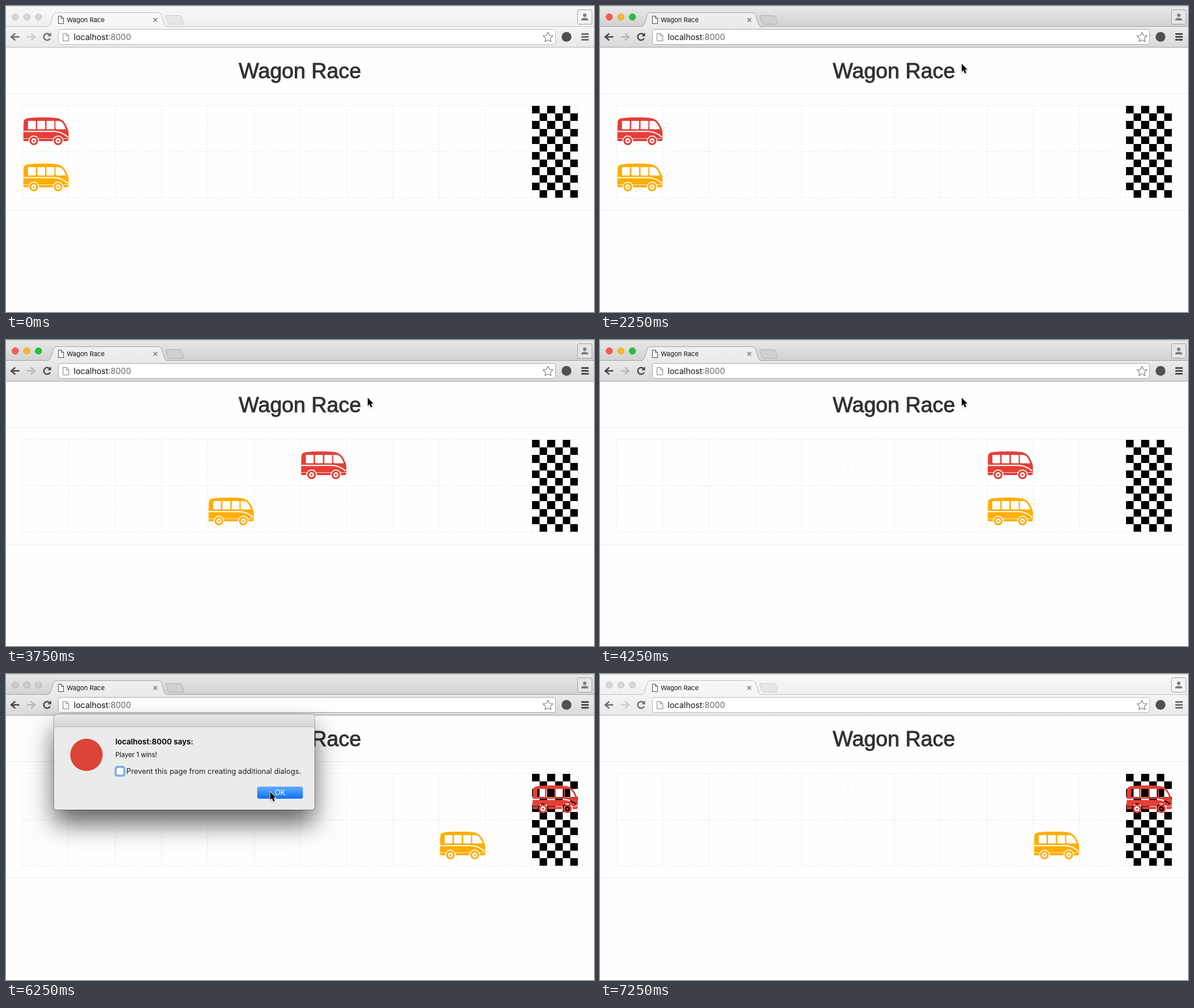
An HTML page with a canvas for the animation above (7500 ms loop, 1016 by 530 pixels).

```html
<!DOCTYPE html>
<html lang="en">
<head>
<meta charset="utf-8">
<title>Wagon Race</title>
<style>
html, body { margin: 0; width: 100%; height: 100%; overflow: hidden; background: #fefefe; }
canvas { display: block; }
</style>
</head>
<body>
<canvas id="stage" width="1016" height="530"></canvas>
<script>
const W = 1016, H = 530, LOOP = 7500, CELL = 80;
const UI = 'Inter, "Open Sans", sans-serif';
const ctx = document.getElementById('stage').getContext('2d');

// Later entries win: [start ms, values...]
const YELLOW = [[0, 0], [3250, 2], [3500, 3], [3750, 4], [4000, 6], [4250, 8], [4500, 9]];
const POINTER = [[0], [250, 625, 100], [5750, 468, 60], [6000, 435, 195],
  [6250, 456.5, 204], [6750, 668, -16], [7000]];

const at = (track, t) => track.filter(step => step[0] <= t).pop().slice(1);

function layer(w, h, draw) {
  const c = document.createElement('canvas');
  c.width = w;
  c.height = h;
  draw(c.getContext('2d'));
  return c;
}

function vertical(g, y0, y1, from, to) {
  const fill = g.createLinearGradient(0, y0, 0, y1);
  fill.addColorStop(0, from);
  fill.addColorStop(1, to);
  return fill;
}

function rect(g, x, y, w, h, color) {
  g.fillStyle = color;
  g.fillRect(x, y, w, h);
}

function round(g, x, y, w, h, r, fill, stroke) {
  g.beginPath();
  g.roundRect(x, y, w, h, r);
  paint(g, fill, stroke);
}

function disc(g, x, y, r, fill, stroke) {
  g.beginPath();
  g.arc(x, y, r, 0, Math.PI * 2);
  paint(g, fill, stroke);
}

function poly(g, points, fill, stroke, width, open) {
  g.beginPath();
  points.forEach(([x, y]) => g.lineTo(x, y));
  if (!open) g.closePath();
  paint(g, fill, stroke, width);
}

function paint(g, fill, stroke, width = 1) {
  if (fill) { g.fillStyle = fill; g.fill(); }
  if (stroke) { g.strokeStyle = stroke; g.lineWidth = width; g.stroke(); }
}

function text(g, str, x, y, font, color, align = 'left') {
  g.font = font;
  g.fillStyle = color;
  g.textAlign = align;
  g.fillText(str, x, y);
}

// ---- Buses: windows, stripes and hubs are holes, so the track shows through
function makeBus(color) {
  return layer(CELL, 50, g => {
    g.fillStyle = color;
    g.fill(new Path2D('M1 25L1.5 7Q2 1.5 12 1Q36 -1 56 .7Q67 1.5 72 9Q77 16 79 25V39L77 41H2Q1 41 1 39Z'));
    g.globalCompositeOperation = 'destination-out';
    for (const x of [9, 25, 41]) round(g, x, 6, 13.5, 14.5, 1, '#000');
    g.fill(new Path2D('M56.5 6H63Q70 7 74.5 20.5H59Q56.5 20.5 56.5 18Z'));
    g.lineWidth = 2;
    g.stroke(new Path2D('M0 24.2H55Q67 24.5 78 34'));
    g.lineWidth = 0.8;
    g.stroke(new Path2D('M1 36.5H79'));
    for (const x of [19, 61]) {
      g.globalCompositeOperation = 'destination-out';
      disc(g, x, 40.5, 9.2, '#000');
      g.globalCompositeOperation = 'source-over';
      disc(g, x, 40.5, 7.6, color);
      g.globalCompositeOperation = 'destination-out';
      disc(g, x, 40.5, 4.4, '#000');
      g.globalCompositeOperation = 'source-over';
      disc(g, x, 40.5, 1.8, color);
    }
  });
}

// ---- Page
function drawPage(g) {
  rect(g, 0, 0, W, H, '#fefefe');
  g.font = '36.8px "Liberation Sans", Arial, sans-serif';
  g.textAlign = 'center';
  g.fillStyle = g.strokeStyle = '#303030';
  g.lineWidth = 0.9;
  g.fillText('Wagon Race', 508, 125);
  g.strokeText('Wagon Race', 508, 125);
  rect(g, 0, 151, W, 1, '#ebebeb');
  rect(g, 0, 353, W, 1, '#ebebeb');

  g.strokeStyle = '#ececec';
  g.lineWidth = 1;
  g.setLineDash([4, 2]);
  g.beginPath();
  for (let x = 28.5; x < 990; x += CELL) { g.moveTo(x, 172); g.lineTo(x, 333); }
  for (let y = 172.5; y < 340; y += CELL) { g.moveTo(28, y); g.lineTo(989, y); }
  g.stroke();
  g.setLineDash([]);

  const s = 79 / 6;
  for (const top of [173, 253]) {
    rect(g, 909, top, 79, 79, '#fff');
    for (let r = 0; r < 6; r++) {
      for (let c = r % 2; c < 6; c += 2) {
        const x = Math.round(c * s), y = Math.round(r * s);
        rect(g, 909 + x, top + y, Math.round((c + 1) * s) - x, Math.round((r + 1) * s) - y, '#000');
      }
    }
  }
}

// ---- Browser window
function sheet(g, x, y, w, h, color) {
  poly(g, [[x, y], [x + w - 4, y], [x + w, y + 4], [x + w, y + h], [x, y + h]], '#fafafa', color);
  poly(g, [[x + w - 4, y], [x + w - 4, y + 4], [x + w, y + 4]], null, color, 1, true);
}

function arrow(g, x, dir, color) {
  poly(g, [[x + dir * 7, 47.5], [x, 53.5], [x + dir * 7, 59.5]], null, color, 2.6, true);
  poly(g, [[x + dir, 53.5], [x + dir * 14, 53.5]], null, color, 2.6, true);
}

function drawChrome(g, active, lit) {
  const ink = active ? '#4b4b4b' : '#707070';
  const edge = active ? '#a4a4a4' : '#c2c2c2';
  rect(g, 0, 0, W, 36, active ? vertical(g, 0, 36, '#e9e9e9', '#d1d1d1') : vertical(g, 0, 36, '#f8f8f8', '#f0f0f0'));
  rect(g, 0, 0, W, 1, active ? '#c4c4c4' : '#d8d8d8');
  rect(g, 0, 36, W, 36, active ? vertical(g, 36, 71, '#ebebeb', '#d9d9d9') : vertical(g, 36, 71, '#f5f5f5', '#e9e9e9'));
  rect(g, 0, 35, W, 1, edge);
  rect(g, 0, 71, W, 1, active ? '#a2a2a2' : '#b8b8b8');

  const lights = lit ? ['#ff5a52', '#fdb92c', '#28c33b'] : Array(3).fill(active ? '#cdcdcd' : '#d7d7d7');
  const rims = lit ? ['#e2463f', '#dfa023', '#1dac2c'] : Array(3).fill(active ? '#b0b0b0' : '#c5c5c5');
  lights.forEach((c, i) => disc(g, 16 + 20 * i, 19, 5.5, c, rims[i]));

  const tab = new Path2D('M71 36Q75 35.5 76.5 32L82 15Q83 11.5 87 11.5H263Q267 11.5 268.5 15L274 32Q275.500 35.5 279 36');
  g.fillStyle = active ? vertical(g, 11, 36, '#f0f0f0', '#ebebeb') : vertical(g, 11, 36, '#f9f9f9', '#f5f5f5');
  g.fill(tab);
  g.strokeStyle = edge;
  g.lineWidth = 1;
  g.stroke(tab);
  const plus = new Path2D('M278 16.500H300Q302.500 16.500 303.500 19L307 29.500Q307.500 31.500 305 31.500H284Q281 31.500 280 29L276 18.500Q275.500 16.500 278 16.500Z');
  g.fillStyle = active ? '#d0d0d0' : '#e6e6e6';
  g.fill(plus);
  g.strokeStyle = active ? '#b0b0b0' : '#cacaca';
  g.stroke(plus);

  sheet(g, 90.5, 17.5, 9, 13, '#4e4e4e');
  text(g, 'Wagon Race', 105, 28, '11px ' + UI, '#111');
  poly(g, [[254.8, 20.8], [261.2, 27.2]], null, '#777', 1.6, true);
  poly(g, [[261.2, 20.8], [254.8, 27.2]], null, '#777', 1.6, true);

  round(g, 987.5, 6.5, 25, 25, 2.5, active ? '#e6e6e6' : '#f4f4f4', '#a0a0a0');
  disc(g, 1000, 16, 3, '#7d7d7d');
  g.fill(new Path2D('M994 25V23Q995 20.500 1000 20.500T1006 23V25Z'));

  arrow(g, 9, 1, ink);
  arrow(g, 50, -1, active ? '#b9b9b9' : '#cecece');
  g.beginPath();
  g.arc(71, 53.5, 5.7, 0.45, Math.PI * 1.75);
  paint(g, null, ink, 2.5);
  poly(g, [[78, 46], [78, 52.5], [71.5, 52.5]], ink);

  round(g, 90.5, 40.5, 859, 26, 3, '#fff', active ? '#a9a9a9' : '#bcbcbc');
  sheet(g, 98.5, 47.5, 10, 13, '#858585');
  g.font = '14px ' + UI;
  const host = 'localhost';
  text(g, host, 117, 59, g.font, '#111');
  text(g, ':8000', 117 + g.measureText(host).width, 59, g.font, '#666');

  const star = Array.from({ length: 10 }, (_, i) => {
    const a = -Math.PI / 2 + i * Math.PI / 5, r = i % 2 ? 4.3 : 9;
    return [936.5 + r * Math.cos(a), 54.5 + r * Math.sin(a)];
  });
  g.lineJoin = 'round';
  poly(g, star, '#fff', '#808080', 1.2);
  g.lineJoin = 'miter';
  disc(g, 968.5, 53.5, 8.5, '#505050');
  for (const y of [47, 52, 57]) round(g, 994, y, 13, 3, 1, ink);
}

// ---- Alert box, on its own layer so it can zoom and fade as one
const BOX = { x: 83, y: 70, w: 450, h: 165 };

function drawAlert(g) {
  const { x, y, w, h } = BOX;
  g.save();
  g.shadowColor = 'rgba(0,0,0,.62)';
  g.shadowBlur = 44;
  g.shadowOffsetY = 24;
  round(g, x, y, w, h, 5, '#ebebeb');
  g.restore();
  round(g, x - 0.5, y - 0.5, w + 1, h + 1, 5, null, 'rgba(0,0,0,.28)');
  round(g, x, y, w, 22, [5, 5, 0, 0], vertical(g, y, y + 22, '#e8e8e8', '#d5d5d5'));
  rect(g, x, 91, w, 1, '#b7b7b7');

  disc(g, 139, 140, 28, '#db4437');
  text(g, 'localhost:8000 says:', 189, 122, 'bold 13px ' + UI, '#111');
  text(g, 'Player 1 wins!', 189, 144, '11.3px ' + UI, '#111');
  round(g, 187.5, 159, 19, 19, 5, '#86b5ec');
  round(g, 190.5, 162, 13, 13, 2.5, '#fff', '#5c95d8');
  text(g, 'Prevent this page from creating additional dialogs.', 208, 173, '12.75px ' + UI, '#222');
  round(g, 434, 195, 79, 21, 4, vertical(g, 195, 216, '#62adfb', '#0f6ffb'));
  text(g, 'OK', 473.5, 210, '13px ' + UI, '#fff', 'center');
}

function showAlert(scale, alpha) {
  const cx = BOX.x + BOX.w / 2, cy = BOX.y + BOX.h / 2;
  ctx.save();
  ctx.globalAlpha = alpha;
  ctx.translate(cx, cy);
  ctx.scale(scale, scale);
  ctx.drawImage(alertBox, -cx, -cy);
  ctx.restore();
}

function drawPointer(x, y) {
  const shape = [[0, 0], [0, 14], [3.1, 11.2], [5.3, 16.4], [7.8, 15.4], [5.7, 10.3], [9.8, 10.1]];
  ctx.save();
  ctx.translate(x, y);
  ctx.lineJoin = 'round';
  ctx.shadowColor = 'rgba(0,0,0,.3)';
  ctx.shadowBlur = 2;
  ctx.shadowOffsetY = 1;
  poly(ctx, shape, null, '#fff', 2);
  ctx.shadowColor = 'transparent';
  poly(ctx, shape, '#000');
  ctx.restore();
}

const page = layer(W, H, drawPage);
const alertBox = layer(W, H, drawAlert);
const redBus = makeBus('#e43f36');
const yellowBus = makeBus('#ffad00');

function render(t) {
  const alerting = t >= 5000 && t < 6500;
  const active = t >= 2250 && t < 7250;
  const red = t < 2750 ? 0 : Math.min(11, Math.floor(t / 250) - 9);
  const [yellow] = at(YELLOW, t);
  const pointer = at(POINTER, t);

  ctx.drawImage(page, 0, 0);
  ctx.drawImage(redBus, 29 + red * CELL, 193);
  ctx.drawImage(yellowBus, 29 + yellow * CELL, 273);
  drawChrome(ctx, active, active && !alerting);
  if (alerting) t < 5250 ? showAlert(340 / 450, 0.66) : showAlert(1, 1);
  if (pointer.length) drawPointer(...pointer);
}

const start = performance.now();
function frame() {
  render((performance.now() - start) % LOOP);
  requestAnimationFrame(frame);
}
frame();
</script>
</body>
</html>
```
